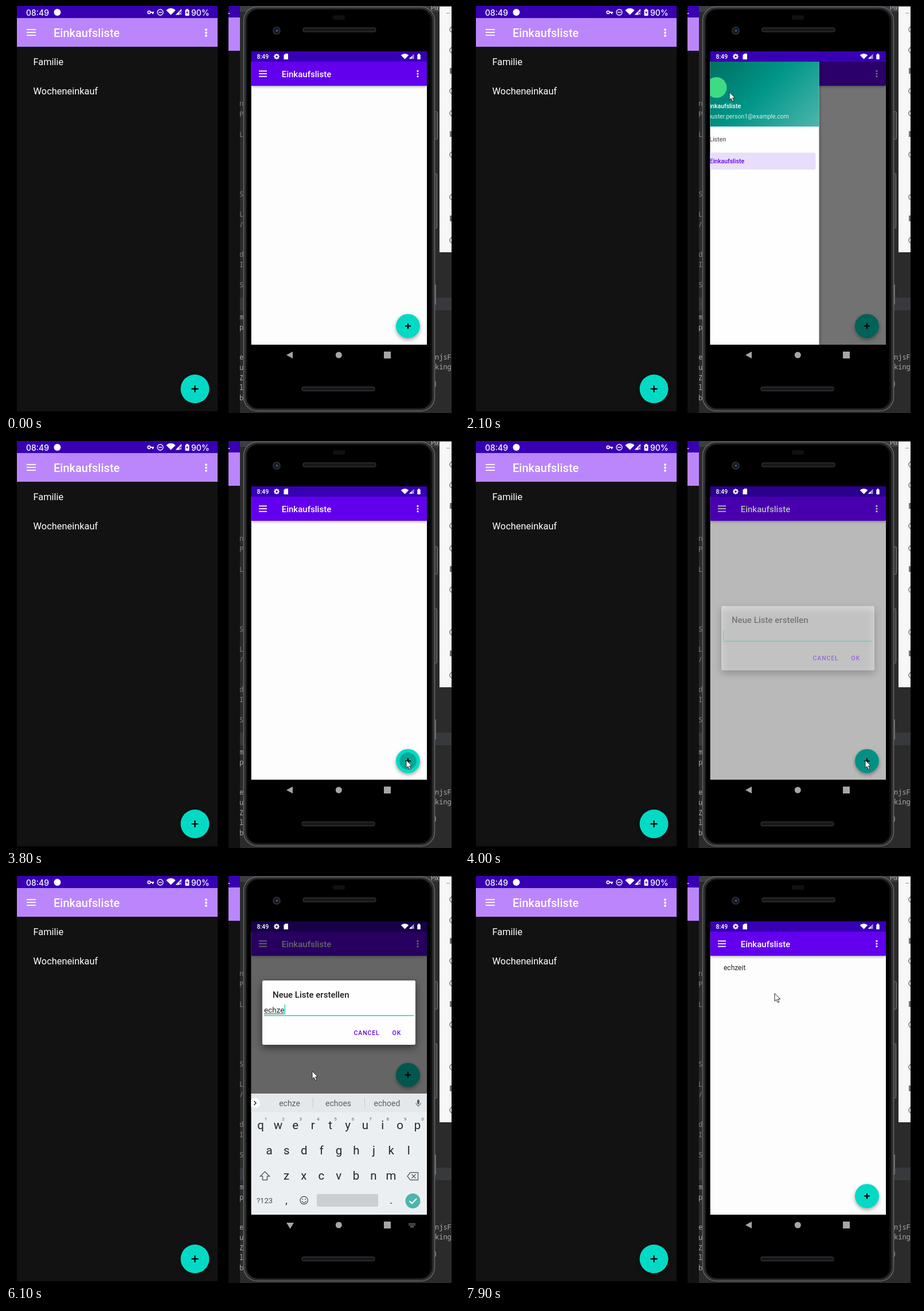
Write an HTML page with a canvas that moves like this. It is 790 px wide and 709 px high and loops after 8000 ms.

```html
<!DOCTYPE html>
<html lang="de">
<head>
<meta charset="utf-8">
<title>Einkaufsliste</title>
<style>
html, body { margin: 0; width: 790px; height: 709px; overflow: hidden; background: #000; }
canvas { display: block; }
</style>
</head>
<body>
<canvas id="stage" width="790" height="709"></canvas>
<script>
const g = document.getElementById('stage').getContext('2d');
const LOOP = 8000;
const SCREEN = { x: 427.5, y: 79, w: 306.5, h: 511, top: 97, bottom: 590 };
const DRAWER_W = 209, KEYS_H = 211;
const TEAL = '#03dac5', VIOLET = '#6200ee', INDIGO = '#3700b3';

// Piecewise interpolation over [time, value...] stops.
function track(t, stops) {
  if (t <= stops[0][0]) return stops[0].slice(1);
  for (let i = 1; i < stops.length; i++) {
    const a = stops[i - 1], b = stops[i];
    if (t <= b[0]) {
      const k = (t - a[0]) / (b[0] - a[0]);
      return a.slice(1).map((v, j) => v + (b[j + 1] - v) * k);
    }
  }
  return stops[stops.length - 1].slice(1);
}

function rect(x, y, w, h, color) { g.fillStyle = color; g.fillRect(x, y, w, h); }
function round(x, y, w, h, r, fill, stroke, lw = 1) {
  g.beginPath(); g.roundRect(x, y, w, h, r);
  if (fill) { g.fillStyle = fill; g.fill(); }
  if (stroke) { g.strokeStyle = stroke; g.lineWidth = lw; g.stroke(); }
}
function disc(x, y, r, color) {
  g.fillStyle = color; g.beginPath(); g.arc(x, y, r, 0, 7); g.fill();
}
function ring(x, y, r, color, lw) {
  g.strokeStyle = color; g.lineWidth = lw; g.beginPath(); g.arc(x, y, r, 0, 7); g.stroke();
}
function shape(points, fill, stroke, lw = 1, close = true) {
  g.beginPath();
  points.forEach(([x, y]) => g.lineTo(x, y));
  if (close) g.closePath();
  if (fill) { g.fillStyle = fill; g.fill(); }
  if (stroke) { g.strokeStyle = stroke; g.lineWidth = lw; g.stroke(); }
}
function line(x1, y1, x2, y2, color, lw = 1) { shape([[x1, y1], [x2, y2]], null, color, lw, false); }
function text(s, x, y, size, color, { weight = 400, family = 'Roboto, sans-serif', align = 'left', spacing = 0 } = {}) {
  g.font = `${weight} ${size}px ${family}`;
  g.textAlign = align;
  g.letterSpacing = spacing + 'px';
  g.fillStyle = color;
  g.fillText(s, x, y);
}
function shadowed(blur, dy, alpha, draw) {
  g.save();
  g.shadowColor = `rgba(0,0,0,${alpha})`; g.shadowBlur = blur; g.shadowOffsetY = dy;
  draw();
  g.restore();
}
function clipped(x, y, w, h, draw) {
  g.save();
  g.beginPath(); g.rect(x, y, w, h); g.clip();
  draw();
  g.restore();
}

function menuIcon(x, y, w, gap) {
  for (let i = -1; i <= 1; i++) rect(x, y + i * gap - .9, w, 1.8, '#fff');
}
function dots(x, y, gap, r) {
  for (let i = -1; i <= 1; i++) disc(x, y + i * gap, r, '#fff');
}
function fab(x, y, r, arm) {
  shadowed(6, 3, .35, () => disc(x, y, r, TEAL));
  rect(x - arm, y - 1.1, arm * 2, 2.2, '#000');
  rect(x - 1.1, y - arm, 2.2, arm * 2, '#000');
}
function wifi(x, y, r) {
  g.fillStyle = '#fff'; g.beginPath();
  g.moveTo(x, y + r); g.arc(x, y + r, r * 1.9, -Math.PI * .75, -Math.PI * .25); g.fill();
}
function signal(x, y, s, color = '#fff') { shape([[x, y + s], [x + s, y + s], [x + s, y]], color); }
function battery(x, y, w, h) {
  round(x, y + 1.5, w, h - 1.5, 1, '#fff');
  rect(x + w * .28, y, w * .44, 2, '#fff');
}

function leftPhone() {
  rect(19, 0, 350, 706, '#121212');
  rect(19, 0, 350, 21, INDIGO);
  rect(19, 21, 350, 50, '#bb86fc');
  const ui = { weight: 500, family: 'Inter, sans-serif' };
  text('08:49', 35, 16.5, 14, '#fff', ui);
  disc(89.5, 11, 6, '#fff');
  ring(249.5, 11, 2.3, '#fff', 1.7);
  rect(252, 10, 6, 2, '#fff'); rect(255, 11, 2, 3, '#fff');
  ring(269, 11, 5, '#fff', 1.3); rect(266, 10.3, 6, 1.4, '#fff');
  wifi(287.5, 9.5, 6);
  signal(295.5, 5, 10.5);
  rect(302.5, 10, 4, 6, INDIGO);
  line(303, 11, 306, 15, '#fff'); line(306, 11, 303, 15, '#fff');
  battery(312.5, 5, 7, 12);
  shape([[316.5, 7.5], [314, 12], [316, 12], [315.5, 15], [318, 10.5], [316, 10.5]], INDIGO);
  text('90%', 323, 16.5, 14, '#fff', ui);
  menuIcon(36, 46, 16, 5);
  text('Einkaufsliste', 83, 54, 20, '#fff', { weight: 500 });
  dots(349, 46.5, 5.3, 2);
  text('Familie', 47.5, 103.3, 16.4, '#fff');
  text('Wocheneinkauf', 47.5, 154, 16.4, '#fff');
  fab(329.5, 667, 25, 6);
}

function desktop() {
  rect(0, 0, 790, 709, '#000');
  leftPhone();
  rect(388, 0, 20, 709, '#121212');
  rect(388, 0, 20, 20, INDIGO);
  rect(388, 20, 20, 58, '#bb86fc');
  rect(388, 12, 2, 2, '#ddd');
  rect(408, 0, 369, 709, '#2b2b2b');
  rect(408, 0, 369, 10, '#3c3f41');
  rect(408, 508, 369, 22, '#38393c');
  const mono = { family: '"Noto Sans Mono", monospace' };
  clipped(408, 0, 369, 709, () => {
    const rows = [169, 188, 223, 327, 362, 380, 432, 450, 485, 541, 559, 611, 629, 647, 664, 682];
    rows.forEach((y, i) => text('nPLSL/dISmpeuZlb'[i], 407, y + 4.5, 12, i < 9 ? '#818181' : '#a5a9ad', mono));
    text('njsF(', 748, 615.5, 12, '#a5a9ad', mono);
    text('king]', 748, 633, 12, '#a5a9ad', mono);
    text(')', 745, 662, 12, '#a5a9ad', mono);
    text('Pix', 741, 6.5, 10, '#bbb');
    rect(756, 1, 21, 428, '#f7f7f7');
    rect(768, 12, 6, 1, '#999');
    [41, 77, 113, 148, 187, 223, 259, 333, 370, 408].forEach((y, i) => {
      if (i % 3 == 2) rect(774, y - 5, 3, 10, '#66757d');
      else ring(779, y, 5, '#66757d', 1.5);
    });
  });
}

function phoneBody() {
  round(746, 184, 6.5, 48, 2, '#3a3a3a', '#777');
  round(746, 292, 5.5, 95, 2, '#3a3a3a', '#777');
  rect(748, 485, 2, 35, '#6b6b6b');
  round(414.5, 1.5, 333, 704, 24, '#242426', '#66686a', 1.5);
  round(417.5, 4, 327, 699, 22, '#101011', '#39393b', 1.5);
  round(421, 7, 319, 693, 18, '#000');
  round(570, 16, 21, 8, 3, '#101012');
  disc(472, 43, 7, '#2b2c30'); disc(472, 43, 4.7, '#11141d'); disc(472.5, 43, 2, '#2e5995');
  for (const [x, y] of [[518, 38], [516, 663.5]]) round(x, y, 127, 7, 3, '#17171a', '#404044');
}

function navBar(keyboardUp) {
  const c = '#a6a6a6';
  if (keyboardUp) {
    shape([[489, 604], [502, 604], [495.5, 614.5]], c);
    for (let r = 0; r < 2; r++) for (let i = 0; i < 5; i++) rect(702.5 + i * 2.4, 605 + r * 2.6, 1.5, 1.5, c);
    rect(705, 610.5, 6.5, 1.3, c);
  } else shape([[489, 608], [500, 602], [500, 614]], c);
  disc(580.3, 608, 5.5, c);
  rect(659, 602, 12, 12, c);
}

function statusBar(dim) {
  rect(SCREEN.x, SCREEN.y, SCREEN.w, 18, INDIGO);
  rect(SCREEN.x, SCREEN.y, SCREEN.w, 18, `rgba(0,0,0,${dim})`);
  text('8:49', 437.5, 92, 10.5, '#fff', { weight: 500 });
  ring(472, 88, 2.9, '#fff', 2.2);
  for (let i = 0; i < 8; i++) {
    const a = i * Math.PI / 4;
    line(472 + 3 * Math.cos(a), 88 + 3 * Math.sin(a), 472 + 5 * Math.cos(a), 88 + 5 * Math.sin(a), '#fff', 1.5);
  }
  shape([[487, 83], [492, 83], [492, 93], [484.5, 93], [484.5, 85.5]], '#fff');
  wifi(695.5, 87.5, 5);
  signal(703, 83.5, 8.5, '#a993dd'); signal(703, 87.5, 4.5);
  battery(717.3, 83, 5.5, 10);
}

function appScreen(t, resized) {
  rect(SCREEN.x, SCREEN.top, SCREEN.w, 493, '#fdfdfd');
  shadowed(5, 1, .4, () => rect(SCREEN.x, SCREEN.top, SCREEN.w, 42, VIOLET));
  menuIcon(441, 118, 14, 4.7);
  text('Einkaufsliste', 480.7, 123.5, 15, '#fff', { weight: 500 });
  dots(718, 118, 4.7, 1.6);
  if (t >= 7600) text('echzeit', 451, 163.5, 12, '#252525');
  const y = resized ? 346.5 : 557.5;
  fab(701, y, 21, 4.8);
  const ripple = track(t, [[3700, 6, .22], [3800, 15, .22], [3900, 20, .18], [4100, 21, 0]]);
  if (t >= 3700 && t < 4100) disc(701, y, ripple[0], `rgba(0,0,0,${ripple[1]})`);
}

function drawer(t) {
  const [shown, scrim] = track(t, [[1700, 0, 0], [1800, 22, 0], [1900, 22, 0], [2000, 120, .35],
    [2100, 190, .55], [2200, 209, .6], [2800, 209, .6], [2900, 69.5, .25], [3000, 10, .04], [3100, 0, 0]]);
  if (!shown) return;
  rect(SCREEN.x, SCREEN.top, SCREEN.w, 493, `rgba(0,0,0,${scrim})`);
  const x = SCREEN.x + shown - DRAWER_W;
  shadowed(7, 0, .4, () => rect(x, SCREEN.top, DRAWER_W, 493, '#fefefe'));
  const grad = g.createLinearGradient(x + 24, 73, x + 185, 234);
  grad.addColorStop(0, '#00695c'); grad.addColorStop(.5, '#009688'); grad.addColorStop(1, '#4db6ac');
  rect(x, SCREEN.top, DRAWER_W, 113, grad);
  disc(x + 30, 142, 18, '#3ddc84');
  text('Einkaufsliste', x + 12, 178, 10.5, '#fff', { weight: 500 });
  text('muster.person1@example.com', x + 12, 195.5, 10.4, '#d7eeeb');
  text('Listen', x + 18, 236, 10.5, '#666', { weight: 500 });
  round(x + 6, 255.5, DRAWER_W - 12, 29.5, 3, '#e8def9');
  text('Einkaufsliste', x + 18, 274, 10.5, VIOLET, { weight: 500 });
}

function dialog(t, typed) {
  const [alpha] = track(t, [[3900, 0], [4000, .45], [4200, 1], [7500, 1], [7700, 0]]);
  if (!alpha) return;
  rect(SCREEN.x, SCREEN.top, SCREEN.w, 493, `rgba(0,0,0,${.6 * alpha})`);
  const [y] = track(t, [[4800, 287.5], [4900, 249], [5000, 198], [5100, 182]]);
  g.save();
  g.globalAlpha = alpha;
  shadowed(14, 5, .5, () => round(447, y, 267, 112, 2.5, '#fefefe'));
  text('Neue Liste erstellen', 465, y + 29.5, 15, '#1d1d1d', { weight: 500 });
  text(typed, 450, y + 56, 13.5, '#222');
  const end = 450 + g.measureText(typed).width;
  if (typed) rect(450, y + 57.5, end - 450, 1, '#333');
  rect(450, y + 60.5, 261, 1.5, TEAL);
  const blink = t < 5400 ? (t - 4400) % 1000 : Math.max(0, t - 6400) % 1000;
  if (blink < 500 || blink == 500) rect(end + .2, y + 42, 1.4, 17, TEAL);
  if (t >= 7300) round(663, y + 79, 36, 24, 3, 'rgba(98,0,238,.13)');
  const button = { weight: 500, spacing: .9 };
  text('CANCEL', 606.5, y + 94.8, 10.5, VIOLET, button);
  text('OK', 673.5, y + 94.8, 10.5, VIOLET, button);
  g.restore();
}

const SUGGESTIONS = { e: ['e', 'even', 'email'], ec: ['ec', 'echo', 'eco'], ech: ['ech', 'echo', 'echoes'],
  echz: ['echz', 'echo', 'echoes'], echze: ['echze', 'echoes', 'echoed'],
  echzei: ['echzei', 'echoes', 'echoed'], echzeit: ['echzeit', 'echoes', 'echoed'] };

function keyboard(t, typed) {
  const [drop] = track(t, [[5000, KEYS_H], [5100, 90], [5200, 0], [7500, 0], [7600, 110], [7700, KEYS_H]]);
  if (drop == KEYS_H) return;
  const ink = '#20282c', soft = '#586368', mid = { align: 'center' };
  g.save();
  g.translate(0, drop);
  rect(SCREEN.x, 379, SCREEN.w, KEYS_H, '#eceff1');
  rect(SCREEN.x, 379, SCREEN.w, 32.5, '#e5e8ea');
  disc(434, 395.5, 9, '#fff');
  shape([[432.5, 392], [436, 395.5], [432.5, 399]], null, ink, 1.5, false);
  (SUGGESTIONS[typed] || []).forEach((word, i) => {
    text(word, 494.5 + i * 85, 401, 14, soft, mid);
    if (i) rect(445 + i * 90, 387, 1, 17, '#c6cacc');
  });
  round(717, 389.5, 4, 8, 2, soft);
  g.strokeStyle = soft; g.lineWidth = 1.2;
  g.beginPath(); g.arc(719, 395.5, 4, 0, Math.PI); g.stroke();
  rect(718.4, 399, 1.2, 3, soft);
  [['qwertyuiop', 444, 441], ['asdfghjkl', 459, 485], ['zxcvbnm', 489, 528.5]].forEach(([row, x, y], r) =>
    [...row].forEach((c, i) => {
      text(c, x + i * 30.4, y, 20.5, ink, mid);
      if (!r) text((i + 1) % 10, x + 9 + i * 30.4, 425.5, 8, soft, mid);
    }));
  shape([[451.5, 515], [459.5, 523], [455.5, 523], [455.5, 529.5], [447.5, 529.5], [447.5, 523], [443.5, 523]], null, soft, 1.5);
  shape([[700, 523], [705, 516.5], [718.5, 516.5], [718.5, 529.5], [705, 529.5]], null, soft, 1.4);
  line(707.5, 519.5, 714.5, 526.5, soft, 1.4); line(714.5, 519.5, 707.5, 526.5, soft, 1.4);
  text('?123', 451, 570, 13, '#455056', mid);
  text(',', 489, 571, 18, ink, mid);
  text('.', 671.5, 571, 18, ink, mid);
  ring(519.7, 565, 6.7, soft, 1.4);
  disc(517.3, 563, 1, soft); disc(522, 563, 1, soft);
  g.beginPath(); g.arc(519.7, 565.5, 3.6, .2, Math.PI - .2); g.stroke();
  round(542, 554, 107, 22, 2, '#cbcfd1');
  disc(709.5, 566, 13, '#4db6ac');
  shape([[703.5, 566], [707.8, 570.3], [716, 562]], null, '#fff', 2, false);
  g.restore();
}

function pointer(t) {
  if (t < 1000) return;
  const [x, y] = track(t, [[1000, 99, 200], [1500, 447, 109], [1900, 447, 109], [2700, 503.5, 274],
    [3000, 503.5, 274], [3600, 698, 556], [4400, 698, 556], [4900, 527, 336], [5300, 534, 340],
    [6700, 534, 340], [7200, 681, 270], [7400, 681, 270], [7800, 540, 204.5]]);
  const arrow = [[0, 0], [0, 13.5], [3.2, 10.8], [5.3, 16], [7.8, 15], [5.6, 10], [9.7, 9.8]];
  shape(arrow.map(([dx, dy]) => [x + dx, y + dy]), '#fff', '#222', 1);
}

function draw(t) {
  const typed = 'echzeit'.slice(0, [5400, 5600, 5800, 5900, 6000, 6300, 6400].filter(k => t >= k).length);
  const resized = t >= 4800 && t < 7600;
  desktop();
  phoneBody();
  navBar(resized);
  clipped(SCREEN.x, SCREEN.y, SCREEN.w, SCREEN.h, () => {
    appScreen(t, resized);
    drawer(t);
    dialog(t, typed);
    keyboard(t, typed);
    const [dim] = track(t, [[3900, 0], [4200, .6], [7500, .6], [7700, 0]]);
    statusBar(dim);
  });
  pointer(t);
}

function tick() {
  draw(Math.floor(performance.now() % LOOP / 100) * 100);
  requestAnimationFrame(tick);
}
tick();
</script>
</body>
</html>
```
